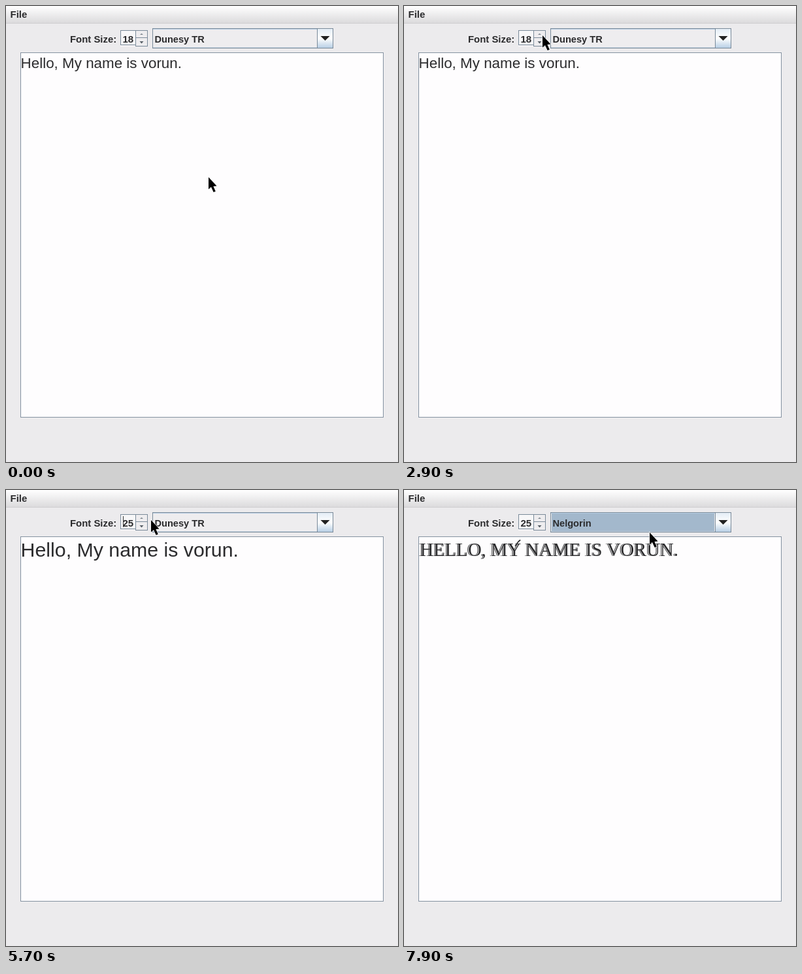
An HTML page with a canvas that plays this animation: 600x698 px, repeating every 8 s.

```html
<!DOCTYPE html>
<html lang="en">
<head>
<meta charset="utf-8">
<title>Text editor</title>
<style>
html, body { margin: 0; width: 100%; height: 100%; overflow: hidden; background: #ecebed; }
canvas { display: block; }
</style>
</head>
<body>
<canvas id="stage" width="600" height="698"></canvas>
<script>
const ctx = document.getElementById('stage').getContext('2d');
ctx.fontKerning = 'none';

const LOOP = 8000, STEP = 100;
const EDGE = '#7a8a99', PANEL = '#eeedef', SELECT = '#a3b8cc', INK = '#2b2b2d';
const SANS = '"Liberation Sans", sans-serif';
const SERIF = '"Liberation Serif", serif';
const FONTS = ['Dunesy TR', 'Nelgorin', 'Kreil', 'Kreil Heavy', 'Kreil Slender',
  'Kreil Curved MF Bold', 'Kreil Unicode MV', 'Runhesdolit'];
const MESSAGE = 'Hello, My name is vorun.';

// Spinner clicks, each adds one to the font size
const CLICKS = [3200, 3600, 4000, 4300, 4600, 4900, 5200];
const OPEN = 6100, PICK = 7000;

// Pointer path: time, x, y
const PATH = [
  [0, 310, 262], [300, 310, 262], [900, 318, 242], [1300, 343, 180], [1800, 241, 109],
  [2300, 222, 70], [2700, 212, 45], [5500, 212, 45], [5700, 222, 46], [6050, 330, 52],
  [6200, 331, 55], [6600, 334, 107], [7000, 335, 107], [7300, 342, 104], [7800, 376, 65], [8000, 376, 65]
];

function pointer(t) {
  let i = 0;
  while (i < PATH.length - 2 && t >= PATH[i + 1][0]) i++;
  const [t0, x0, y0] = PATH[i], [t1, x1, y1] = PATH[i + 1];
  const p = (t - t0) / (t1 - t0), e = p * p * (3 - 2 * p);
  return { x: x0 + (x1 - x0) * e, y: y0 + (y1 - y0) * e };
}

function rect(x, y, w, h, fill) {
  ctx.fillStyle = fill;
  ctx.fillRect(x, y, w, h);
}

function box(x, y, w, h, fill, edge = EDGE) {
  rect(x, y, w, h, edge);
  rect(x + 1, y + 1, w - 2, h - 2, fill);
}

function shade(y, h, ...colors) {
  const g = ctx.createLinearGradient(0, y, 0, y + h);
  colors.forEach((c, i) => g.addColorStop(i / (colors.length - 1), c));
  return g;
}

function text(str, x, y, font, fill = INK) {
  ctx.font = font;
  ctx.fillStyle = fill;
  ctx.fillText(str, x, y);
}

const label = (str, x, y, size = 14.6) => text(str, x, y, `bold ${size}px ${SANS}`);

// Triangle centred on x, from its base at y to its point at y + h
function arrow(x, y, half, h, fill = '#222') {
  ctx.fillStyle = fill;
  ctx.beginPath();
  ctx.moveTo(x - half, y);
  ctx.lineTo(x + half, y);
  ctx.lineTo(x, y + h);
  ctx.fill();
}

function drawFrame() {
  rect(0, 0, 600, 698, '#ecebed');
  rect(0, 0, 600, 27, shade(0, 27, '#ffffff', '#dad9db'));
  rect(0, 26, 600, 1, '#d0cfd1');
  label('File', 6.5, 18, 15);
  label('Font Size:', 98, 56, 14.9);
}

function drawSpinner(value, focused) {
  rect(175, 37, 42, 25, '#f6f5f7');
  box(175, 37, 24, 23, '#f7f7f8');
  box(198, 37, 19, 12, PANEL);
  box(198, 48, 19, 14, PANEL);
  arrow(207.5, 44, 2.5, -2, '#777f88');
  arrow(207.5, 54, 3, 3.5, '#596068');
  label(value, 178.5, 56, 15);
  if (focused) rect(179, 40, 1, 17, '#333');
}

function drawCombo(name, selected) {
  box(224, 34, 277, 31, PANEL);
  rect(225, 35, 251, 1, '#b8cfe5');
  rect(225, 63, 251, 1, '#c5d3e1');
  if (selected) rect(226, 36, 249, 27, SELECT);
  box(476, 34, 25, 31, shade(35, 29, '#e4edf6', '#ffffff', '#b8cfe5'));
  arrow(488.5, 46, 7, 7);
  label(name, 227.5, 56);
}

function drawMessage(size, fancy) {
  const px = 22.4 + (size - 18) * 1.13;
  if (!fancy) {
    text(MESSAGE, 22.6, 74.6 + px * 0.905, `${px}px ${SANS}`);
    return;
  }
  const caps = MESSAGE.toUpperCase(), font = `28.7px ${SERIF}`;
  [[-0.9, INK], [0.1, '#fefdfe'], [1, INK]].forEach(([dx, c]) => text(caps, 23.6 + dx, 101, font, c));
  const end = 23.6 + ctx.measureText(caps.slice(0, 9)).width;
  ctx.strokeStyle = INK;
  ctx.lineWidth = 1.6;
  ctx.beginPath();
  ctx.moveTo(end - 8, 86);
  ctx.quadraticCurveTo(end - 4, 79, end, 76.5);
  ctx.stroke();
}

function drawPopup(hover) {
  box(224, 66, 277, 180, PANEL, '#1c1c1e');
  FONTS.forEach((name, i) => {
    const y = 67 + i * 22.3;
    if (i === hover) rect(225, Math.round(y), 254, 22, SELECT);
    label(name, 226.5, Math.round(y + 17));
  });
  rect(478, 67, 21, 178, EDGE);
  rect(480, 67, 18, 178, '#ebeaec');
  box(479, 67, 20, 19, PANEL, '#a9b3bd');
  box(479, 225, 20, 20, PANEL, '#a9b3bd');
  arrow(489, 79, 6, -6);
  arrow(489, 232, 6, 6);
  box(479, 86, 19, 21, shade(87, 19, '#dce8f4', '#ffffff', '#b8cfe5'), '#6382bf');
  for (let y = 92; y <= 100; y += 3) rect(483, y, 12, 1, '#6382bf');
}

function drawPointer({ x, y }) {
  const shape = [0, 0, 0, 18.5, 4, 15, 7.7, 23, 10.8, 21.8, 7.4, 14, 12.5, 13.5];
  ctx.beginPath();
  for (let i = 0; i < shape.length; i += 2) ctx.lineTo(x + shape[i], y + shape[i + 1]);
  ctx.closePath();
  ctx.strokeStyle = 'rgba(255,255,255,0.8)';
  ctx.lineWidth = 1.4;
  ctx.stroke();
  ctx.fillStyle = '#000';
  ctx.fill();
}

function draw(t) {
  const size = 18 + CLICKS.filter(c => t >= c).length;
  const open = t >= OPEN && t < PICK, picked = t >= PICK;
  const at = pointer(t);
  drawFrame();
  drawSpinner(String(size), t >= CLICKS[0] && t < OPEN);
  drawCombo(FONTS[picked ? 1 : 0], picked);
  box(22, 71, 556, 559, '#fefdfe', '#8492a0');
  drawMessage(size, picked);
  if (open) drawPopup(at.y >= 89 ? 1 : 0);
  drawPointer(at);
}

const start = performance.now();
function tick(now) {
  const t = Math.max(0, now - start) % LOOP;
  draw(Math.floor(t / STEP) * STEP);
  requestAnimationFrame(tick);
}
draw(0);
requestAnimationFrame(tick);
</script>
</body>
</html>
```
